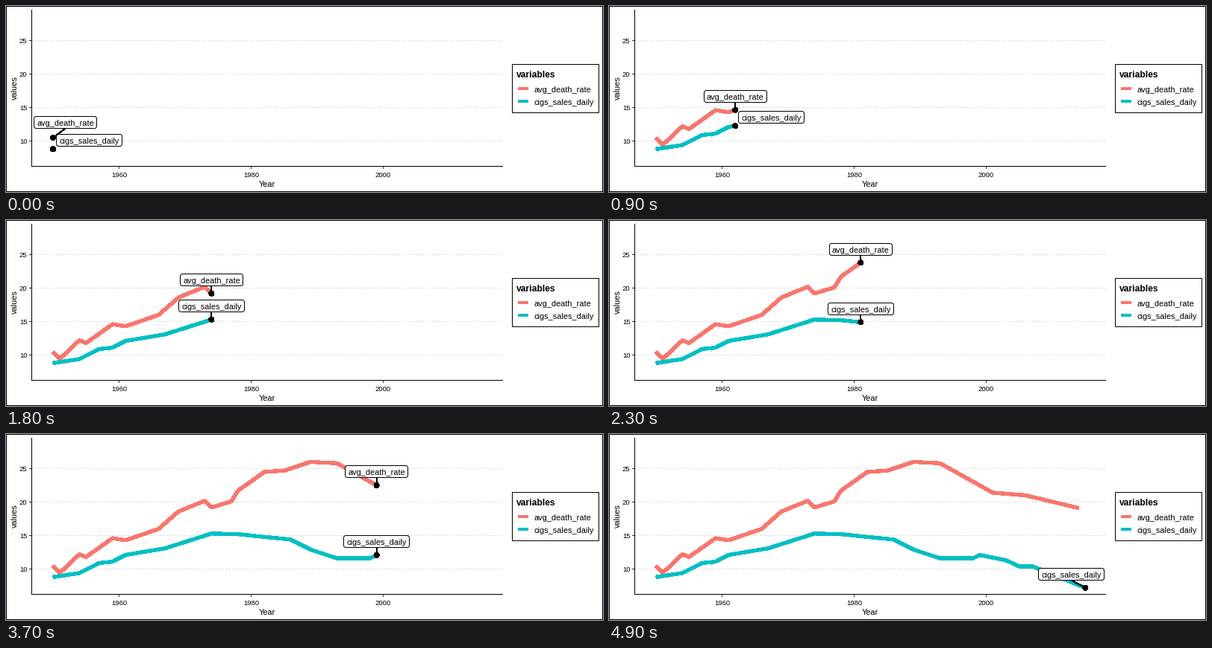
Write a matplotlib script that moves like this. It is 800x250 px and loops after 10 s.

```python
import numpy as np
import matplotlib.pyplot as plt
from matplotlib.animation import FuncAnimation
from matplotlib.patches import Circle, FancyBboxPatch, Rectangle

DPI = 100
W, H = 800, 250
PX = 72 / DPI  # points per pixel
FRAMES, STEPS = 100, 49
CORAL, TEAL = "#F8766D", "#00BFC4"
DEATH, CIGS = "avg_death_rate", "cigs_sales_daily"

plt.rcParams["font.family"] = "Liberation Sans"
plt.rcParams["lines.solid_joinstyle"] = "round"
plt.rcParams["lines.solid_capstyle"] = "butt"

# Turning points of each trend: years since 1950, value
death_keys = [(0, 10.5), (1, 9.4), (4, 12.2), (5, 11.8), (9, 14.6),
              (11, 14.3), (16, 16), (19, 18.6), (23, 20.2), (24, 19.2),
              (27, 20.1), (28, 21.7), (32, 24.5), (35, 24.7), (39, 26),
              (43, 25.8), (51, 21.4), (56, 21), (64, 19.1)]
cigs_keys = [(0, 8.8), (4, 9.4), (7, 10.9), (9, 11.1), (11, 12.1),
             (17, 13.1), (24, 15.3), (28, 15.2), (36, 14.4), (39, 12.9),
             (43, 11.6), (48, 11.6), (49, 12.1), (53, 11.3), (55, 10.4),
             (57, 10.4), (65, 7.2)]


def year_x(t):
    return 63 + 8.85 * t


def value_y(v):
    return 271.5 - 9 * v


def last_year(step):
    years = np.arange(66)
    return years[np.round(years * STEPS / 65) == step][-1]


fig = plt.figure(figsize=(W / DPI, H / DPI), dpi=DPI, facecolor="white")
ax = fig.add_axes([0, 0, 1, 1])
ax.set_xlim(0, W)
ax.set_ylim(H, 0)
ax.axis("off")


def line(x, y, color="black", width=1, z=1, **kw):
    return ax.plot(x, y, color=color, lw=width * PX, zorder=z, snap=False,
                   antialiased=False, **kw)[0]


def write(x, y, s, size, **kw):
    return ax.text(x, y, s, fontsize=size * PX, va="baseline", **kw)


def frame_box(x, y, w, h):
    ax.add_patch(Rectangle((x, y), w, h, fc="none", ec="black", lw=PX,
                           snap=False))


# Panel
frame_box(0.5, 0.5, W - 1, H - 1)
for v in range(10, 30, 5):
    y = value_y(v)
    line([35, 665], [y, y], "#BEBEBE", dashes=(1, 3), dash_capstyle="butt")
    line([31, 34], [y, y], "#333333")
    write(28.5, y + 3.5, str(v), 9.5, ha="right")
for year in range(1960, 2001, 20):
    x = year_x(year - 1950)
    line([x, x], [216, 219], "#333333")
    write(x, 230, str(year), 9.5, ha="center")
line([34.5, 34.5], [5, 216])
line([34, 666], [215.5, 215.5])
write(350, 243, "Year", 11, ha="center")
write(14.5, 110, "values", 11, ha="center", rotation=90,
      rotation_mode="anchor")

# Legend
frame_box(678.5, 78.5, 116, 65)
write(684, 96, "variables", 12, weight="bold")
for name, color, y in ((DEATH, CORAL, 111), (CIGS, TEAL, 128)):
    line([686, 700], [y, y], color, 4)
    write(708, y + 5, name, 11)


class Track:
    """A growing line with its end point and label."""

    def __init__(self, name, keys, color, width):
        t, v = zip(*keys)
        years = np.arange(t[-1] + 1)
        self.x = year_x(years)
        self.y = value_y(np.interp(years, t, v))
        self.w = width
        self.path = line([], [], color, 4.3, 2)
        self.dot = Circle((0, 0), 3.5, fc="black", lw=0, zorder=3,
                          antialiased=False)
        self.link = line([], [], z=4)
        self.box = FancyBboxPatch(
            (0, 0), width, 16, boxstyle="round,pad=0,rounding_size=3",
            fc="white", ec="black", lw=PX, zorder=5)
        ax.add_patch(self.dot)
        ax.add_patch(self.box)
        self.text = write(0, 0, name, 11, ha="center", zorder=6)

    def grow(self, n):
        self.path.set_data(self.x[:n + 1], self.y[:n + 1])
        shown = n < len(self.x)
        for part in (self.dot, self.link, self.box, self.text):
            part.set_visible(shown)
        if shown:
            self.dot.center = self.x[n], self.y[n]
        return shown

    def place(self, n, cx, top, linked=True):
        cx = np.clip(cx, 37.5 + self.w / 2, 663.5 - self.w / 2)
        left, top = np.floor((cx - self.w / 2, top)) + 0.5
        self.box.set_bounds(left, top, self.w, 16)
        self.text.set_position((cx, top + 12.5))
        self.link.set_data([self.x[n], cx], [self.y[n], top + 16])
        self.link.set_visible(linked)


death = Track(DEATH, death_keys, CORAL, 84)
cigs = Track(CIGS, cigs_keys, TEAL, 88)


def update(i):
    n = last_year(min(i, STEPS))
    cigs.grow(n)
    has_death = death.grow(n)
    x, y = cigs.x[n], cigs.y[n]
    # The lower label steps aside while the two points are close
    aside = has_death and y - death.y[n] < 27
    if aside:
        cigs.place(n, x + 4.5 + cigs.w / 2, y - 19.6, linked=False)
    else:
        cigs.place(n, x, y - 26.2)
    if has_death:
        top = death.y[n] - 26.2
        if aside:
            top = min(top, y - 43.5)
        death.place(n, death.x[n], top)
    return []


anim = FuncAnimation(fig, update, frames=FRAMES, interval=100,
                     init_func=lambda: update(0), repeat=True,
                     repeat_delay=0, blit=False)
plt.show()
```
